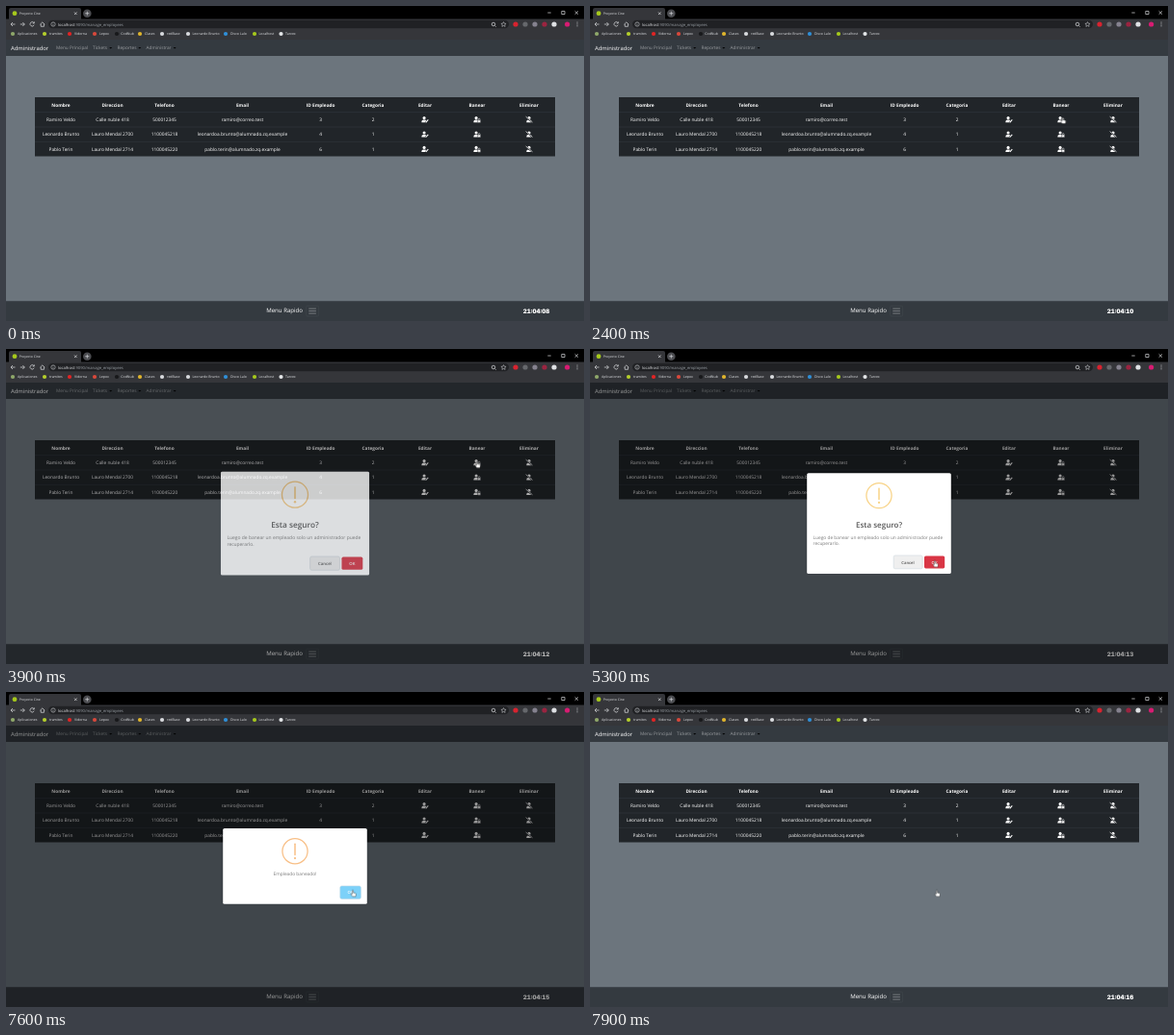
An HTML page for the animation above (8 s loop, 600 px wide and 328 px high).

```html
<!DOCTYPE html>
<html lang="es">
<head>
<meta charset="utf-8">
<title>Proyecto Cine</title>
<style>
html, body { margin: 0; height: 100%; overflow: hidden; background: #6c757d; }
svg { display: block; width: 100vw; height: 100vh; }
text { font-family: "Open Sans", "Noto Sans", sans-serif; font-size: 4.8px; fill: #fff; text-rendering: geometricPrecision; }
.mid { text-anchor: middle; }
.bold { font-weight: 700; font-size: 4.75px; }
.brand { font-size: 5.9px; }
.nav text { font-size: 4.75px; fill: #999c9f; }
.nav path { fill: #999c9f; }
.small text { font-size: 3.55px; fill: #e2e4e7; }
.line { fill: none; stroke: #d0d2d5; stroke-width: .75; }
#clock { font: 900 6.25px Inter, "Open Sans", sans-serif; font-variant-numeric: tabular-nums; }
.title { font-size: 8px; font-weight: 600; fill: #595959; }
.note { fill: #7b7b7b; }
.button { font-size: 4.2px; font-weight: 600; }

#veil { animation: veil 8s infinite; }
#ask { transform-origin: 300px 181.6px; animation: ask 8s infinite, pop 8s -4.25s infinite; }
#done { transform-origin: 300px 181.4px; animation: done 8s infinite, pop 8s -1.55s infinite; }
.warn { stroke: #f8d486; fill: #f8d486; animation: pulse .8s infinite alternate; }
#ask .warn { animation-delay: -1.05s; }
#done .warn { animation-delay: -1.55s; }
#cursor { animation: move 8s infinite, seen 8s step-end infinite; }
#hand { animation: hand 8s step-end infinite; }
#arrow { animation: arrow 8s step-end infinite; }

@keyframes veil {
  0%, 46.875% { opacity: 0; }
  50.625%, 95.25% { opacity: 1; }
  98.75%, 100% { opacity: 0; }
}
@keyframes ask {
  0%, 46.875% { opacity: 0; }
  49.375%, 80.62% { opacity: 1; }
  80.625%, 100% { opacity: 0; }
}
@keyframes done {
  0%, 80.62% { opacity: 0; }
  80.625%, 95.25% { opacity: 1; }
  97.75%, 100% { opacity: 0; }
}
@keyframes pop {
  0% { transform: scale(.5); }
  1.6875% { transform: scale(1.05); }
  3% { transform: scale(.95); }
  3.75%, 100% { transform: scale(1); }
}
@keyframes pulse { to { stroke: #f8bb86; fill: #f8bb86; } }
@keyframes move {
  0%, 22% { transform: translate(510px, 180px); }
  28.5%, 33.75% { transform: translate(490.5px, 116px); }
  36.25%, 38.75% { transform: translate(489.5px, 117px); }
  40%, 57.5% { transform: translate(489px, 117.2px); }
  65%, 80% { transform: translate(358px, 220.5px); }
  82%, 83.5% { transform: translate(354px, 219.5px); }
  90%, 100% { transform: translate(360px, 206.5px); }
}
@keyframes seen { 0% { visibility: hidden; } 22%, 100% { visibility: visible; } }
@keyframes hand {
  0% { opacity: 0; } 28% { opacity: 1; } 58% { opacity: 0; }
  64% { opacity: 1; } 80.625% { opacity: 0; } 88%, 100% { opacity: 1; }
}
@keyframes arrow {
  0% { opacity: 1; } 28% { opacity: 0; } 58% { opacity: 1; }
  64% { opacity: 0; } 80.625% { opacity: 1; } 88%, 100% { opacity: 0; }
}
</style>
</head>
<body>
<svg viewBox="0 0 600 328" preserveAspectRatio="none">
  <defs>
    <g id="user"><circle cx="-.9" cy="-1.6" r="1.55"/><path d="M-3.6 3v-.7q0-1.9 1.9-1.9h1.7q1.9 0 1.9 1.9v.7z"/></g>
    <g id="edit"><use href="#user"/><path d="M.9 2.9 3.3.2" stroke="#212529" stroke-width="2"/><path d="M.9 2.9 3.3.2" stroke="#fff" stroke-width="1.1"/></g>
    <g id="ban"><use href="#user"/><rect x=".7" y=".5" width="3" height="2.7" rx=".4" stroke="#212529" stroke-width=".5"/><path d="M1.4.5v-.7a.8.8 0 0 1 1.6 0v.7" fill="none" stroke="#fff" stroke-width=".5"/></g>
    <g id="drop"><use href="#user" x=".9"/><path d="M-3.4-2.7 3.5 2.9" stroke="#212529" stroke-width="1.6"/><path d="M-3.4-3 3.5 2.8" stroke="#fff" stroke-width=".7"/></g>
    <path id="caret" d="M0 0h3l-1.5 1.6z"/>
    <g id="warning">
      <circle r="13.1" style="fill:none" stroke-width="1.25"/>
      <rect x="-.75" y="-8.2" width="1.5" height="12.6" rx=".6" stroke="none"/>
      <circle cy="7.3" r="1.15" stroke="none"/>
    </g>
  </defs>

  <!-- browser -->
  <path d="M0 0h600v14H0z"/>
  <path d="M0 13.5h600V35H0zM3 13.5V4q0-2 2-2h71q2 0 2 2v9.5z" fill="#35363a"/>
  <rect x="44" y="14.8" width="478" height="8.4" rx="4.2" fill="#202124"/>
  <circle cx="9" cy="7.7" r="2.4" fill="#a6c91c"/>
  <circle cx="84.3" cy="7.7" r="4.3" fill="#4b4c50"/>
  <path class="line" d="M71 6.4l2.6 2.6m0-2.6L71 9M82.3 7.7h4m-2-2v4M562.3 7h3.4M576.8 5.4h3.2v3.2h-3.2zM590.6 5.3l3.4 3.4m0-3.4-3.4 3.4"/>
  <path class="line" d="M9.5 19H5m2-2-2 2 2 2M14.8 19h4.5m-2-2 2 2-2 2M29 17.6a2.2 2.2 0 1 0 .2 2.1M29.3 16.3v1.7h-1.7M35.4 19.2l2.4-2.3 2.4 2.3M36.2 18.8v2.5h3.2v-2.5"/>
  <path class="line" d="M49 18.8v1.6M49 17.4v.6M507.3 20.3l1.6 1.6M516.5 16.6l.8 1.6 1.8.2-1.4 1.2.4 1.8-1.6-.9-1.6.9.4-1.8-1.4-1.2 1.8-.2z" style="stroke-width:.55"/>
  <circle class="line" cx="49" cy="19" r="2.2" style="stroke-width:.55"/>
  <circle class="line" cx="506" cy="19" r="1.8"/>
  <g id="extras"></g>
  <path d="M593 16.6v.9m0 1v.9m0 1v.9" class="line" style="stroke-width:.9"/>
  <g class="small" id="bookmarks">
    <text x="13.8" y="9" style="font-size:3.45px">Proyecto Cine</text>
    <text x="54" y="20.6" style="font-size:4.15px">localhost<tspan fill="#9aa0a6">:9090/manage_employees</tspan></text>
  </g>

  <!-- page -->
  <path d="M0 35h600v293H0z" fill="#6c757d"/>
  <path d="M0 35h600v17H0zM0 307.3h600V328H0z" fill="#343a40"/>
  <text class="brand" x="5" y="45.8" style="font-size:5.85px">Administrador</text>
  <g class="nav">
    <text x="52" y="45.4">Menu Principal</text>
    <text x="90" y="45.4">Tickets</text><use href="#caret" x="107.2" y="43"/>
    <text x="115.5" y="45.4">Reportes</text><use href="#caret" x="137.3" y="43"/>
    <text x="145.5" y="45.4">Administrar</text><use href="#caret" x="173.6" y="43"/>
  </g>
  <path d="M30 95h540v61.5H30z" fill="#212529"/>
  <path d="M30 110.6h540M30 126h540M30 141.4h540" stroke="#343a40" stroke-width=".5"/>
  <g id="table" fill="#fff"></g>
  <text class="brand" x="270.2" y="319.3" style="font-size:6.1px">Menu Rapido</text>
  <rect x="311.6" y="312.2" width="13" height="10.8" rx="1.2" fill="none" stroke="#484e53" stroke-width=".4"/>
  <path d="M314.3 315.1h7.6m-7.6 2.5h7.6m-7.6 2.5h7.6" stroke="#999c9f" stroke-width=".65"/>
  <text id="clock" x="550.5" y="320.3" class="mid">21:04:08</text>

  <!-- dialogs -->
  <g id="veil">
    <path d="M0 35h600v293H0z" opacity=".4"/>
    <g id="ask">
      <rect x="225.2" y="129.2" width="149.6" height="104.8" rx="1.6" fill="#fff"/>
      <use href="#warning" class="warn" x="300" y="152.6"/>
      <text class="title mid" x="300" y="186">Esta seguro?</text>
      <text class="note" x="231.6" y="197.9">Luego de banear un empleado solo un administrador puede</text>
      <text class="note" x="231.6" y="204.3">recuperarlo.</text>
      <rect x="315.2" y="215" width="29.9" height="13.8" rx="1.6" fill="#efefef" stroke="#d3dbe1" stroke-width=".7"/>
      <text class="button mid" x="330" y="223.5" style="fill:#555">Cancel</text>
      <rect x="347" y="215.5" width="21.2" height="12.9" rx="1.6" fill="#d93645"/>
      <text class="button mid" x="357.6" y="223.5">OK</text>
    </g>
    <g id="done">
      <rect x="225.2" y="142" width="149.6" height="78.8" rx="1.6" fill="#fff"/>
      <use href="#warning" class="warn" x="300" y="165.8"/>
      <text class="note mid" x="300" y="191.2">Empleado baneado!</text>
      <rect x="346.8" y="202" width="21.6" height="13.4" rx="1.7" fill="#7cd1f9" stroke="#b9d6e6" stroke-width=".6"/>
      <text class="button mid" x="357.6" y="210.3">OK</text>
    </g>
  </g>

  <g id="cursor" fill="#fff" stroke="#000" stroke-width=".35">
    <path id="arrow" d="M0 0v5l1.2-1.1.8 1.8.8-.4-.8-1.7h1.6z"/>
    <path id="hand" d="M-.6.5a.6.6 0 0 1 1.2 0v2.2l2 .4q.9.2.8 1.2L3 6.5H-.2l-2-2.6q.3-.8 1.6.1z"/>
  </g>
</svg>
<script>
const $ = id => document.getElementById(id);
const add = (id, html) => $(id).insertAdjacentHTML('beforeend', html);

// [icon x, text x, icon colour, label]
[
  [7, 12, '#8fa86a', 'Aplicaciones'],
  [40, 45, '#b5cf2b', 'tramites'],
  [66, 71, '#e32424', 'Vidorna'],
  [92, 97, '#d9483b', 'Lepox'],
  [115, 119.3, '#17181a', 'CodNub'],
  [139, 144, '#e0b52c', 'Clases'],
  [162, 167, '#d8dadd', 'redBase'],
  [189, 193.5, '#d8dadd', 'Leonardo Brunto'],
  [228, 233, '#2f8fd8', 'Disco Lalo'],
  [258, 262.5, '#a6c91c', 'Localhost'],
  [285.5, 290, '#e4e6e8', 'Tarvex']
].forEach(([x, tx, color, label]) => add('bookmarks',
  `<circle cx="${x}" cy="29" r="2.1" fill="${color}"/><text x="${tx}" y="30.3">${label}</text>`));

[[529, '#d8232f'], [539, '#66686c'], [549, '#85828f'], [559, '#9b2440'], [569, '#dfe1e4'], [582.6, '#d81b72']]
  .forEach(([x, color]) => add('extras', `<circle cx="${x}" cy="19" r="2.6" fill="${color}"/>`));

const cols = [57, 110.5, 164.5, 245.5, 326.6, 381, 435, 489, 543];
const rows = [
  ['Nombre', 'Direccion', 'Telefono', 'Email', 'ID Empleado', 'Categoria', 'Editar', 'Banear', 'Eliminar'],
  ['Ramiro Veldo', 'Calle nuble 418', '500012345', 'ramiro@correo.test', 3, 2],
  ['Leonardo Brunto', 'Lauro Mendal 2700', '1100045218', 'leonardoa.brunto@alumnado.zq.example', 4, 1],
  ['Pablo Terin', 'Lauro Mendal 2714', '1100045220', 'pablo.terin@alumnado.zq.example', 6, 1]
];
rows.forEach((row, r) => {
  const y = 102.8 + r * 15.4;
  row.forEach((cell, c) => add('table',
    `<text class="mid ${r ? '' : 'bold'}" x="${cols[c]}" y="${y + 1.7}">${cell}</text>`));
  if (r) ['edit', 'ban', 'drop'].forEach((icon, i) => add('table',
    `<use href="#${icon}" x="${cols[6 + i]}" y="${y}"/>`));
});

function tick() {
  const t = performance.now() % 8000;
  const sec = 8 + Math.floor((t + 220) / 1000);
  $('clock').textContent = '21:04:' + String(sec).padStart(2, '0');
  requestAnimationFrame(tick);
}
tick();
</script>
</body>
</html>
```
